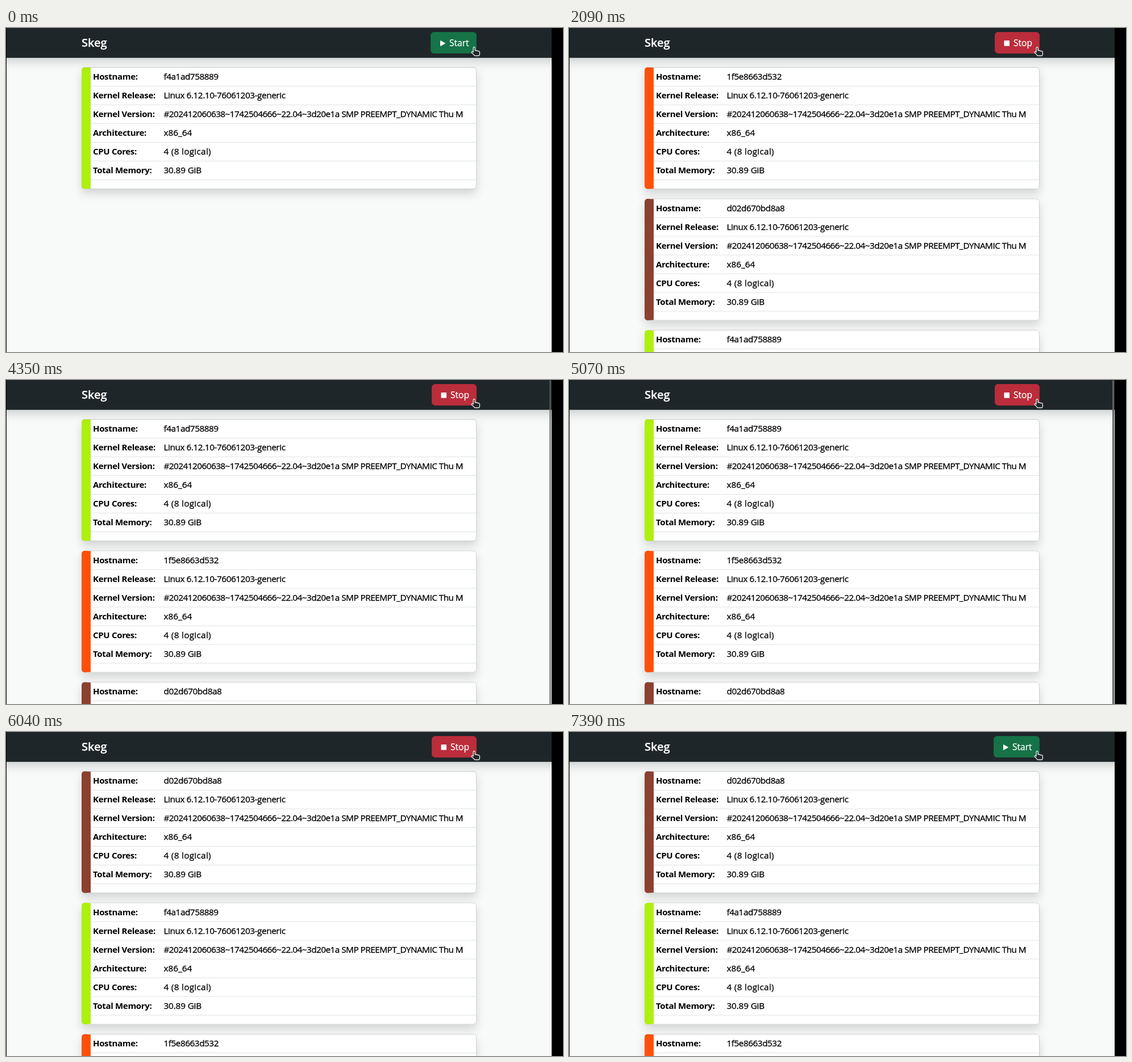
Write an HTML page that moves like this. It is 980 by 571 pixels and loops after 8060 ms.

```html
<!DOCTYPE html>
<html lang="en">
<head>
<meta charset="utf-8">
<title>Skeg</title>
<style>
  html, body { margin: 0; width: 100%; height: 100%; overflow: hidden; background: #000; }
  svg { display: block; width: 980px; height: 571px; font: 15.3px "Open Sans", "Noto Sans", sans-serif; }
  .raised { filter: drop-shadow(0 8px 8px rgba(0, 0, 0, .15)); }
  .label { font-size: 15px; font-weight: 700; letter-spacing: -.32px; }
  .value { stroke: #000; stroke-width: .3px; }
  .light { fill: #fff; stroke: #fff; stroke-width: .25px; }
</style>
</head>
<body>
<svg id="stage" viewBox="0 0 980 571">
  <defs><clipPath id="page"><rect x="1" width="959" height="571"/></clipPath></defs>
  <g clip-path="url(#page)">
    <rect width="980" height="571" fill="#f8faf9"/>
    <g id="cards"></g>
    <rect class="raised" x="-30" y="-30" width="1020" height="82.6" fill="#1f2629"/>
    <text class="light" x="133" y="32.8" font-size="20" font-weight="600">Skeg</text>
    <rect id="button" y="7.5" height="37" rx="5.5"/>
    <path id="icon" fill="#fff" stroke="#fff" stroke-linejoin="round"/>
    <text id="caption" class="light" y="31.7" font-size="15.6"></text>
    <rect id="scrollbar" x="956" y="1" width="3" height="570" fill="#5f6466"/>
  </g>
  <path fill="#22272a" stroke="#fff" stroke-width="1.2" stroke-linejoin="round" transform="translate(.6 .2)"
    d="M821.5 35.2q0-1.7 1.5-1.7t1.5 1.7v4.3q1.5-.8 2.6.5 1.5-.8 2.6.6 2.8-.5 3.1 2v2.4q0 1.4-1 3.6h-7.8l-5.2-5.2q-.6-1.3.6-1.8 1.1-.2 2.1 1z"/>
</svg>
<script>
const LOOP = 8060, CARD_STEP = 231.6;
const hosts = [
  { name: "f4a1ad758889", color: "#aef00e" },
  { name: "d02d670bd8a8", color: "#8c4130" },
  { name: "1f5e8663d532", color: "#ff5009" }
];
// label, value, letter spacing
const rows = [
  ["Hostname:", "", -.45],
  ["Kernel Release:", "Linux 6.12.10-76061203-generic", -.42],
  ["Kernel Version:", "#202412060638~1742504666~22.04~3d20e1a SMP PREEMPT_DYNAMIC Thu M", -.52],
  ["Architecture:", "x86_64", 0],
  ["CPU Cores:", "4 (8 logical)", .3],
  ["Total Memory:", "30.89 GiB", -.15]
];
const arrivals = [0, 240, 2090, 4080, 6040];
const buttons = {
  start: { x: 747.5, fill: "#157347", edge: "#146c43", icon: "M764.5 22.5v9l8-4.5z", text: "Start", textX: 780 },
  stop: { x: 749.5, fill: "#bb2d3b", edge: "#b02a37", icon: "M766 22.6h8.6v8.6h-8.6z", text: "Stop", textX: 782 }
};

const byId = id => document.getElementById(id);
const clamp = v => Math.min(1, Math.max(0, v));

function add(parent, tag, attrs, text = "") {
  const node = document.createElementNS("http://www.w3.org/2000/svg", tag);
  set(node, attrs);
  node.textContent = text;
  return parent.appendChild(node);
}

function set(node, attrs) {
  for (const key in attrs) node.setAttribute(key, attrs[key]);
}

function makeCard(slot) {
  const group = add(byId("cards"), "g", { transform: `translate(133 ${69 + slot * CARD_STEP})` });
  add(group, "rect", { class: "raised", width: 695, height: 215, rx: 6, fill: "#fff" });
  add(group, "rect", { x: .5, y: .5, width: 694, height: 214, rx: 5.5, fill: "none", stroke: "#ccd0d1" });
  // The coloured edge meets the thin border in a mitre
  const bar = add(group, "path", { d: "M16 1v213L5 214.7Q0 214 0 209V6Q0 1 5 .3z" });
  const values = rows.map(([label, value, spacing], i) => {
    const y = 22.3 + i * 33;
    add(group, "text", { class: "label", x: 20, y }, label);
    add(group, "path", { d: `M16 ${33.5 + i * 33}H694`, stroke: "#dee2e6" });
    return add(group, "text", { class: "value", x: 144.5, y, "letter-spacing": spacing }, value);
  });
  return { group, bar, host: values[0] };
}

const cards = [0, 1, 2].map(makeCard);

function draw(t) {
  const count = arrivals.filter(start => t >= start).length;
  cards.forEach((card, slot) => {
    const index = count - 1 - slot;
    set(card.group, { visibility: index < 0 ? "hidden" : "visible" });
    if (index < 0) return;
    const host = hosts[index % hosts.length];
    card.host.textContent = host.name;
    set(card.bar, { fill: host.color });
  });

  const state = t >= 170 && t < 7390 ? buttons.stop : buttons.start;
  const pressed = t >= 100 && t < 170;
  set(byId("button"), {
    x: state.x, width: 827.5 - state.x, stroke: state.edge,
    fill: pressed ? state.edge : state.fill
  });
  set(byId("icon"), { d: state.icon });
  set(byId("caption"), { x: state.textX });
  byId("caption").textContent = state.text;

  const pulse = (show, hide) => clamp((t - show) / 380) * clamp((hide - t) / 400);
  set(byId("scrollbar"), { opacity: pulse(4080, 5460) + pulse(6040, 7320) });
}

const began = performance.now();
function tick() {
  draw((performance.now() - began) % LOOP);
  requestAnimationFrame(tick);
}
tick();
</script>
</body>
</html>
```
